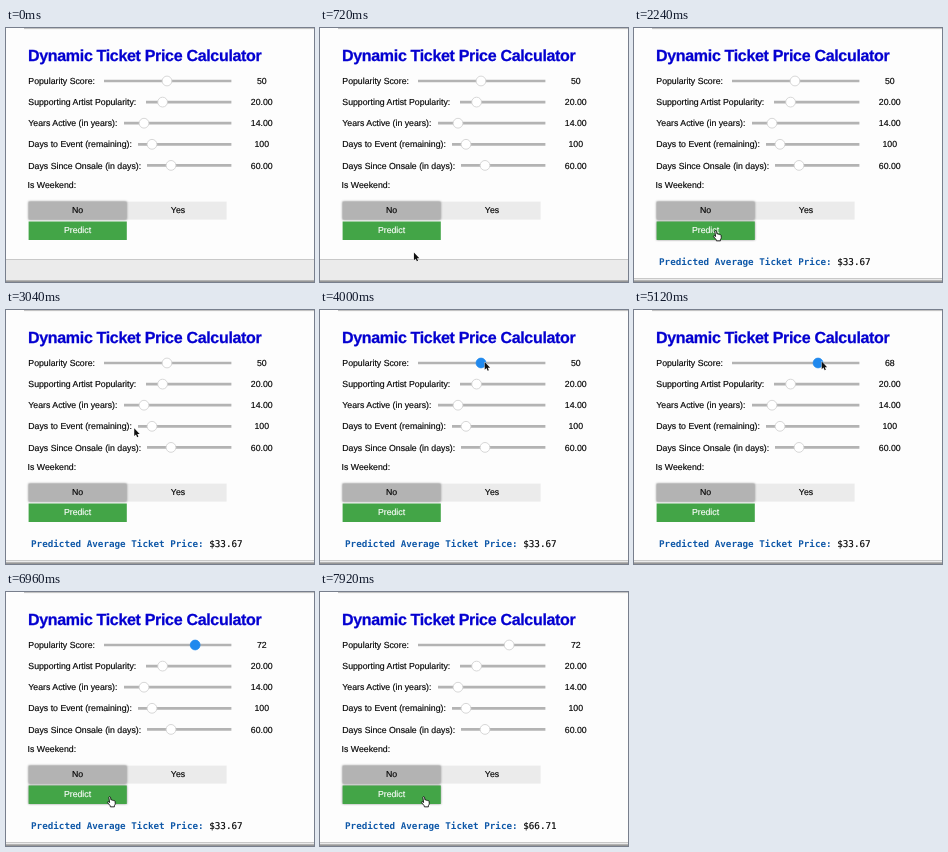
Write an HTML page that moves like this. It is 308x254 px and loops after 8 s.

```html
<!DOCTYPE html>
<html lang="en">
<head>
<meta charset="utf-8">
<title>Ticket price calculator</title>
<style>
  html, body { margin: 0; width: 100%; height: 100%; overflow: hidden; background: #fdfdfd; }
  svg { display: block; width: 308px; height: 254px; font: 8.75px "Liberation Sans", Arial, sans-serif; fill: #000; }
  text { stroke: #000; stroke-width: .15; text-rendering: geometricPrecision; }
  .title { font-size: 16px; font-weight: bold; letter-spacing: -.32px; fill: #0400d0; stroke: #0400d0; stroke-width: .25; }
  .mid { text-anchor: middle; }
  .track { stroke: #b3b3b3; stroke-width: 2.7; }
  .thumb { fill: #fff; stroke: #cdcdcd; stroke-width: .8; }
  .thumb.active { fill: #2089ee; stroke: #2089ee; }
  .raised { filter: drop-shadow(0 0.5px 1px rgba(0, 0, 0, .45)); }
  #predict { fill: #43a547; }
  #predict.pressed { fill: #30803a; }
  #caption { fill: #fff; stroke: #fff; }
  #output { font: 9.25px "DejaVu Sans Mono", monospace; white-space: pre; }
  #output .label { font-weight: bold; fill: #0f58a8; stroke: none; }
  #hand { fill: #fff; stroke: #111; stroke-width: 1; stroke-linejoin: round; }
  #arrow { fill: #111; stroke: #fff; stroke-width: .8; stroke-linejoin: round; paint-order: stroke; }
</style>
</head>
<body>
<svg viewBox="0 0 308 254">
  <rect width="308" height="254" fill="#fdfdfd"/>
  <path d="M18 .6H308" stroke="#bdbdbd"/>
  <text class="title" x="22" y="33">Dynamic Ticket Price Calculator</text>
  <g id="rows"></g>
  <text x="21.6" y="160">Is Weekend:</text>
  <rect x="120.6" y="173.6" width="100" height="18" fill="#ebebeb"/>
  <rect class="raised" x="22.6" y="173.6" width="98" height="18" fill="#b3b3b3"/>
  <text class="mid" x="71.5" y="185.3">No</text>
  <text class="mid" x="172" y="185.3">Yes</text>
  <rect id="predict" x="22.6" y="193.5" width="98.2" height="18.5"/>
  <text id="caption" class="mid" x="71.5" y="205.3">Predict</text>
  <text id="output" x="25" y="237.4"><tspan class="label">Predicted Average Ticket Price:</tspan><tspan id="price"></tspan></text>
  <g id="footer">
    <rect width="308" height="30" fill="#ebebeb"/>
    <rect width="308" height="1" fill="#c8c8c8"/>
  </g>
  <rect y="252.6" width="308" height="1" fill="#606060"/>
  <g id="cursor">
    <path id="arrow" transform="scale(.8)" d="M0 0V9.6L2.2 7.6L3.7 11L5.2 10.3L3.8 7.1H6.8Z"/>
    <path id="hand" transform="translate(-1.2 0) scale(.9)" d="M0 .8Q1-.4 1.9.8L2.5 4Q3.3 3.2 4 4.2Q4.9 3.6 5.5 4.7Q6.6 4.3 7 5.5L7.2 8Q7 9.4 6.2 10.2V11.5H1.8L1.5 10.2L-1.5 6.7Q-1.4 5.3 0 6L.9 6.7Z"/>
  </g>
</svg>
<script>
  const LOOP = 8000;
  const $ = id => document.getElementById(id);

  // label, track start, thumb x, value
  const rows = [
    ["Popularity Score:", 98, 161, "50"],
    ["Supporting Artist Popularity:", 140, 156.6, "20.00"],
    ["Years Active (in years):", 118, 138, "14.00"],
    ["Days to Event (remaining):", 132, 146, "100"],
    ["Days Since Onsale (in days):", 141, 165, "60.00"]
  ];
  $("rows").innerHTML = rows.map(([label, start, x, value], i) => {
    const y = 53 + i * 21.1;
    return `<text x="22.3" y="${y + 3.1}">${label}</text>
      <path class="track" d="M${start} ${y}H225.4"/>
      <circle class="thumb" cx="${x}" cy="${y}" r="4.9"/>
      <text class="mid value" x="255.8" y="${y + 3.1}">${value}</text>`;
  }).join("");
  const thumb = document.querySelector(".thumb");
  const score = document.querySelector(".value");

  // time, x, y of the pointer tip
  const path = [
    [300, 112, 258], [1040, 82, 202.5], [2480, 82, 202.5], [3520, 164.7, 52],
    [4240, 164.7, 52], [5120, 187.7, 51.5], [5440, 192.8, 52], [5640, 192.8, 52],
    [6240, 170.2, 154.6], [6800, 104, 204.5], [LOOP, 104, 204.5]
  ];
  const drag = [[4240, 50], [5120, 68], [5440, 72]];

  function sample(keys, t) {
    if (t <= keys[0][0]) return keys[0].slice(1);
    const i = keys.findIndex(k => t < k[0]);
    if (i < 0) return keys[keys.length - 1].slice(1);
    const a = keys[i - 1], b = keys[i];
    const p = (t - a[0]) / (b[0] - a[0]);
    const e = p * p * (3 - 2 * p);
    return a.slice(1).map((v, j) => v + (b[j + 1] - v) * e);
  }

  const within = (t, from, to) => t >= from && t < to;

  function draw(t) {
    const [x, y] = sample(path, t);
    const [value] = sample(drag, t);
    const shown = Math.round(value);
    const ready = t >= 1520;
    const overButtons = within(x, 23, 221) && within(y, 174, 212);
    const overPredict = within(x, 23, 121) && within(y, 194, 212);

    thumb.setAttribute("cx", 161 + (shown - 50) * 1.28);
    thumb.classList.toggle("active", within(t, 3680, 7040));
    score.textContent = shown;

    $("predict").classList.toggle("pressed", within(t, 1360, 1520) || within(t, 7040, 7200));
    $("predict").classList.toggle("raised", overPredict);
    $("output").style.display = ready ? "" : "none";
    $("price").textContent = t < 7200 ? " $33.67" : " $66.71";
    $("footer").setAttribute("transform", `translate(0 ${ready ? 250 : 231})`);

    $("cursor").setAttribute("transform", `translate(${x} ${y})`);
    $("hand").style.display = overButtons ? "" : "none";
    $("arrow").style.display = overButtons ? "none" : "";
  }

  const begin = performance.now();
  function tick() {
    draw((performance.now() - begin) % LOOP);
    requestAnimationFrame(tick);
  }
  tick();
</script>
</body>
</html>
```
